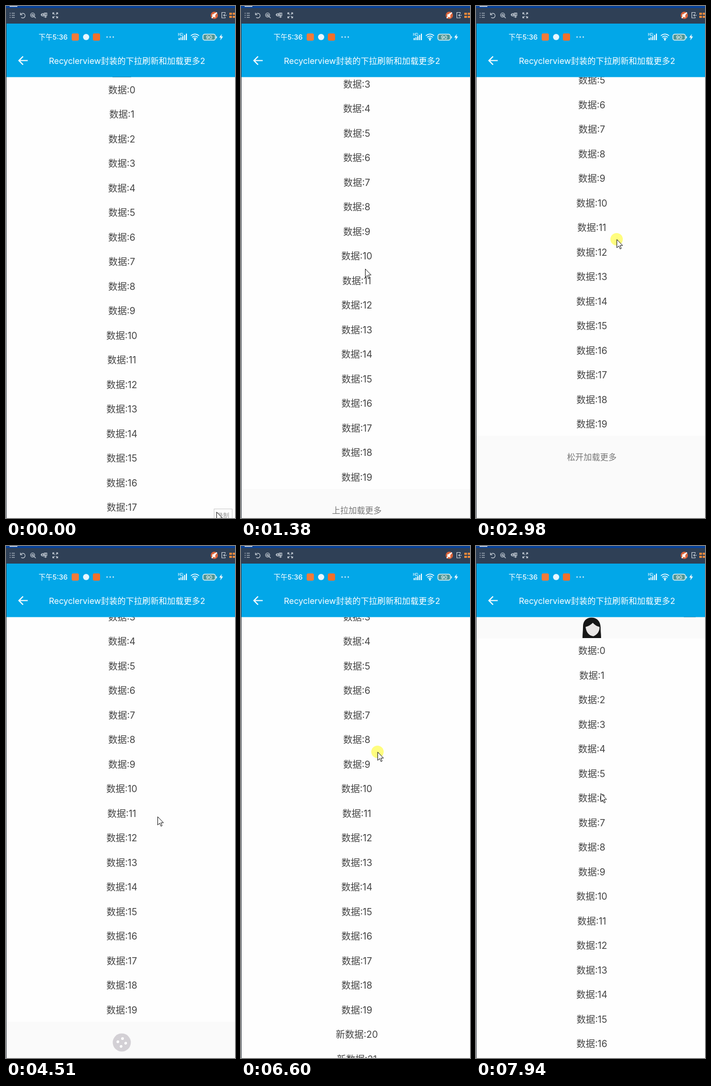
Animation, 443 px wide and 990 px high, one loop 8000 ms. Source, as an HTML page:

```html
<!DOCTYPE html>
<html lang="zh">
<head>
<meta charset="utf-8">
<style>
  html, body { margin: 0; width: 100%; height: 100%; overflow: hidden; background: #fefefe; }
  svg { display: block; font-family: Inter, "Noto Sans CJK SC", "Noto Sans CJK", sans-serif; }
  .line { fill: none; stroke: #d5dbe3; stroke-width: 1.1; }
  .row { font-size: 18px; fill: #444; text-anchor: middle; }
  .hint { font-size: 16px; fill: #777; text-anchor: middle; }
</style>
</head>
<body>
<svg width="443" height="990" viewBox="0 0 443 990">
  <defs><clipPath id="view"><rect y="137" width="443" height="853"/></clipPath></defs>
  <rect width="443" height="990" fill="#fefefe"/>

  <g clip-path="url(#view)">
    <g id="list">
      <rect y="-100" width="443" height="238" fill="#fafafa"/>
      <path d="M206 137.500c0-8 1-14 1-22c0-11 6-17.500 16.500-17.500s17 7 17.500 18c0 8 1 14 1 21.500z" fill="#161616"/>
      <path d="M212 116q8-2 14-8q5 6 13 8q0 13-12 18q-13-2-15-18z" fill="#e9e6e5"/>
      <g id="rows"></g>
      <g id="footer">
        <rect y="1087.500" width="443" height="400" fill="#fafafa"/>
        <text id="hint" class="hint" x="224" y="1134"></text>
        <g id="spinner">
          <circle cx="224" cy="1127.500" r="17.500" fill="#d3d0d5"/>
          <g id="dots" fill="#fff"></g>
        </g>
      </g>
    </g>
    <path id="edge" d="M402 137.500h23" stroke="#aaa"/>
  </g>

  <!-- window toolbar -->
  <rect width="443" height="4" fill="#07429a"/>
  <rect x="7" width="15" height="1.500" fill="#e4e8ee"/>
  <rect y="4" width="443" height="30" fill="#2f4056"/>
  <g class="line">
    <path d="M7 14h2M11 14h6M7 18h2M11 18h6M7 22h2M11 22h6"/>
    <path d="M28 13v4h4M28.500 16.500a4.500 4.500 0 1 1 1 5.500"/>
    <circle cx="51.500" cy="17.500" r="4"/><path d="M54.500 20.500l3 3M50 18.500v-2h3v3z"/>
    <circle cx="71" cy="17" r="2.500"/><path d="M67 17h8M74 13.500h5v5h-5zM73 21h6M76.500 13v10"/>
    <path d="M90.500 16v-3h3M97 13h3v3M100 20v3h-3M93.500 23h-3v-3M91 13.500l3 3M99.500 13.500l-3 3M91 22.500l3-3M99.500 22.500l-3-3"/>
    <path d="M424 15v-2.500h-6.500v10.500h6.500v-2M427 18h-6M423 16l-2 2l2 2"/>
  </g>
  <circle cx="403" cy="18" r="7" fill="#d9633a"/>
  <path d="M399 16h2l4-3v10l-4-3h-2z" fill="#f6ece8"/>
  <path d="M398 23.500l10-11" stroke="#fff" stroke-width="2"/>
  <path d="M432 13h5v4h-5zM438.500 13h4.500v4h-4.500zM432 19h5v4h-5zM438.500 19h4.500v4h-4.500z" fill="#f08a3c"/>

  <!-- phone status bar and title -->
  <rect y="34" width="443" height="103.500" fill="#02a7e8"/>
  <g fill="#fff">
    <text x="63" y="65" font-size="13.500" font-weight="500">下午5:36</text>
    <rect x="127" y="53" width="14" height="14" rx="3" fill="#f27b3a"/>
    <circle cx="155" cy="60" r="6" fill="#e6f6fd"/>
    <rect x="168" y="53" width="14" height="14" rx="3" fill="#f1702c"/>
    <circle cx="195.500" cy="60" r="1.200"/><circle cx="201.500" cy="60" r="1.200"/><circle cx="207.500" cy="60" r="1.200"/>
    <text x="332.500" y="58" font-size="7" font-weight="500">HD</text>
    <path d="M334 62h2v4h-2zM337.500 60.500h2v5.500h-2zM341 58.500h2v7.500h-2zM344.500 56h2v10h-2zM348 53.500h2v12.500h-2z"/>
    <circle cx="365.500" cy="65" r="1.800"/>
    <path d="M357.500 57.500q8-6.500 16 0M360 60.500q5.500-4.500 11 0M362.500 63q3-2.500 6 0" fill="none" stroke="#fff" stroke-width="1.600"/>
    <rect x="381" y="54.500" width="24" height="11.500" rx="3.500" fill="#4d9696" stroke="#e8f4f4" stroke-width="1.500"/>
    <path d="M406.500 58.500h1.500v4h-1.500z"/>
    <text x="393" y="63.700" font-size="9.500" font-weight="500" text-anchor="middle">90</text>
    <path d="M417.500 54l-5 7h3.200l-1.200 5.500l5.300-7.500h-3.300z"/>
    <text x="83" y="112" font-size="16">Recyclerview封装的下拉刷新和加载更多2</text>
  </g>
  <path d="M42 105.500H26M33 97.500l-8 8l8 8" fill="none" stroke="#fff" stroke-width="2.200"/>
  <path d="M.5 34v956" stroke="#333a42"/>

  <g id="tip">
    <rect x="402.500" y="972.500" width="35" height="24" fill="#fff" stroke="#c9c9c9"/>
    <text x="408" y="990" font-size="12" fill="#999">录制</text>
  </g>
  <g id="cursor">
    <circle id="press" r="12" fill="#fffd78" opacity=".95"/>
    <path d="M.5 .5v16l3.700-3.500l2.600 5.800l2.300-1l-2.500-5.700h5z" fill="#fff" stroke="#111"/>
  </g>
</svg>
<script>
const LOOP = 8000, PITCH = 47.5, LOADED = 5700, RELEASED = 3530;
const $ = id => document.getElementById(id);
const show = (id, on) => $(id).setAttribute('visibility', on ? 'visible' : 'hidden');
const move = (id, x, y) => $(id).setAttribute('transform', `translate(${x} ${y})`);

const smooth = p => p * p * (3 - 2 * p);
const linear = p => p;
const out = p => 1 - (1 - p) ** 3;

// Each key: time, values, easing into it
const cursorKeys = [
  [0, [407, 978]], [70, [407, 978]], [780, [236, 767]], [860, [236, 767]],
  [1020, [238, 680], linear], [1330, [240, 508], linear], [1720, [240, 508]],
  [2010, [238, 891]], [2070, [238, 891]], [2420, [249, 603], linear],
  [2980, [272, 451], out], [3520, [272, 451]], [4260, [293, 523]], [4790, [293, 523]],
  [5560, [285, 490]], [6400, [264, 398]], [6610, [264, 398]], [6800, [258, 520], linear],
  [6950, [244, 372]], [6990, [244, 372]], [7200, [241, 478], linear]
];
const scrollKeys = [
  [860, [0]], [1020, [87.5], linear], [1330, [153.5], linear], [1390, [153.5]],
  [1670, [87.5], out], [2070, [87.5]], [2420, [198], linear], [2980, [256], out],
  [RELEASED, [256]], [3850, [167.5], out], [6610, [167.5]], [6800, [46], linear],
  [6950, [0], out], [6990, [0]], [7200, [-40.5], linear]
];
const presses = [[860, 1370], [2070, RELEASED], [6540, 6800], [6990, 7220]];

function sample(keys, t) {
  const i = keys.findIndex(k => k[0] > t);
  if (i < 0) return keys[keys.length - 1][1];
  if (i === 0) return keys[0][1];
  const [t0, from] = keys[i - 1], [t1, to, ease = smooth] = keys[i];
  const p = ease((t - t0) / (t1 - t0));
  return from.map((v, n) => v + (to[n] - v) * p);
}

function add(parent, tag, attrs, text = '') {
  const el = document.createElementNS('http://www.w3.org/2000/svg', tag);
  for (const name in attrs) el.setAttribute(name, attrs[name]);
  el.textContent = text;
  $(parent).append(el);
  return el;
}

const rows = Array.from({ length: 24 }, (_, i) =>
  add('rows', 'text', { class: 'row', x: 224, y: 168.5 + PITCH * i }, (i < 20 ? '数据:' : '新数据:') + i));
for (let i = 0; i < 4; i++) {
  const a = i * Math.PI / 2;
  add('dots', 'circle', { cx: 224 + 7.7 * Math.cos(a), cy: 1127.5 + 7.7 * Math.sin(a), r: 2.6 });
}

function draw(t) {
  const [x, y] = sample(cursorKeys, t), [scroll] = sample(scrollKeys, t);
  const loading = t >= RELEASED && t < LOADED;
  move('cursor', Math.round(x), Math.round(y));
  move('list', 0, -scroll);
  show('press', presses.some(([a, b]) => t >= a && t < b));
  show('tip', t < 300);
  show('edge', t >= 7310);
  $('footer').style.display = t < LOADED ? '' : 'none';
  $('spinner').style.display = loading ? '' : 'none';
  $('hint').textContent = loading ? '' : scroll > 215 ? '松开加载更多' : '上拉加载更多';
  $('dots').setAttribute('transform', `rotate(${10 + (t - 4510) * 0.25} 224 1127.5)`);
  rows.forEach((row, i) => { row.style.display = i < 20 || t >= LOADED ? '' : 'none'; });
}

const start = performance.now();
function tick() {
  draw((performance.now() - start) % LOOP);
  requestAnimationFrame(tick);
}
tick();
</script>
</body>
</html>
```
